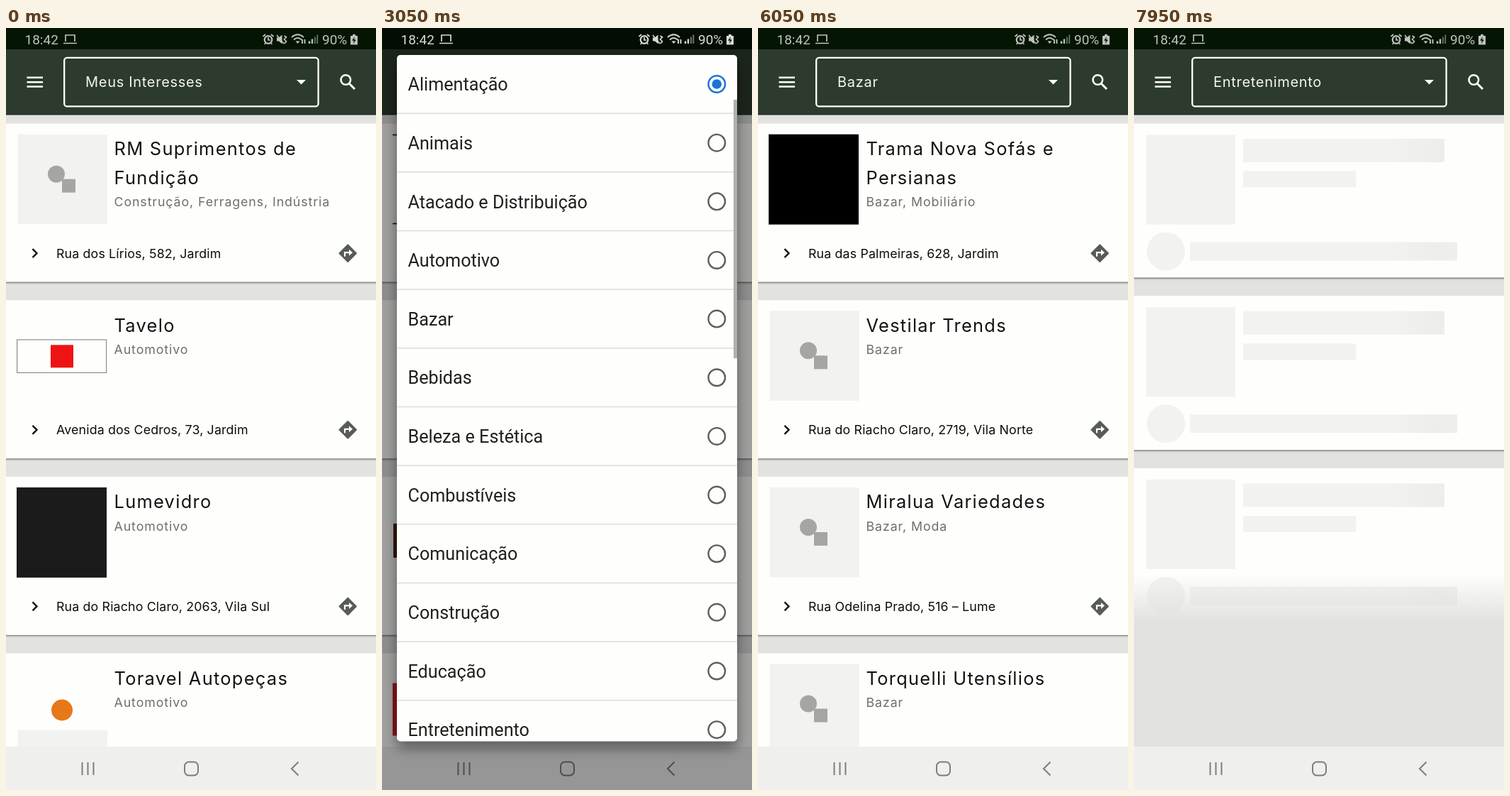
Animation of 522x1073 px, one loop 8 s. Source, as an HTML page:

```html
<!DOCTYPE html>
<html lang="pt-BR">
<head>
<meta charset="utf-8">
<title>Filtro por interesse</title>
<style>
html, body { margin: 0; width: 100%; height: 100%; overflow: hidden; background: #e2e3e1; }
svg { display: block; width: 100vw; height: 100vh; }
text { white-space: pre; }
.title, .sub, .addr, .filter { font-family: Inter, "Open Sans", sans-serif; }
.title { font-size: 25.4px; letter-spacing: 1.3px; fill: #111311; }
.sub { font-size: 17.8px; letter-spacing: .9px; fill: #6d6f6c; }
.addr { font-size: 17.8px; letter-spacing: .15px; fill: #0c0e0c; }
.filter { font-size: 20px; letter-spacing: .7px; fill: #f4f5f3; }
.option { font: 25.2px Roboto, sans-serif; fill: #1e201e; }
.clock { font: 19px Roboto, sans-serif; fill: currentColor; }
.line { fill: none; stroke: currentColor; }
</style>
</head>
<body>
<svg viewBox="0 0 522 1073" preserveAspectRatio="none">
  <defs>
    <linearGradient id="shimmer" gradientUnits="userSpaceOnUse" x1="-70" x2="70" y1="0" y2="0">
      <stop offset="0" stop-color="#f2f3f1"/>
      <stop offset=".5" stop-color="#edeeec"/>
      <stop offset="1" stop-color="#f2f3f1"/>
    </linearGradient>
    <linearGradient id="fadeOut" x1="0" x2="0" y1="0" y2="1">
      <stop offset="0" stop-color="#e2e3e1" stop-opacity="0"/>
      <stop offset="1" stop-color="#e2e3e1"/>
    </linearGradient>
    <filter id="blur" x="-10%" y="-10%" width="120%" height="120%"><feGaussianBlur stdDeviation="9"/></filter>
    <clipPath id="sheet"><rect x="21" y="38" width="480" height="966.5" rx="5"/></clipPath>
    <clipPath id="rowClip"><rect id="rowBox" x="21" width="480" height="82.65"/></clipPath>
  </defs>

  <rect width="522" height="1073" fill="#e2e3e1"/>
  <g id="pages"></g>

  <g id="header">
    <rect y="30" width="522" height="92" fill="#2c3b2d"/>
    <rect y="121" width="522" height="1.5" fill="#202c21"/>
    <g class="line" color="#fff">
      <path d="M29.5 69.8H52M29.5 76.2H52M29.5 82.6H52" stroke-width="2.5"/>
      <rect x="82.2" y="41.8" width="358.4" height="68.6" rx="4" stroke-width="2.3"/>
      <circle cx="479.3" cy="73" r="6.8" stroke-width="2.6"/>
      <path d="M484 78L492 86" stroke-width="3"/>
    </g>
    <path d="M410 73H423L416.5 79.6Z" fill="#fff"/>
    <text class="filter" id="filter" x="112" y="83"></text>
  </g>

  <rect y="1012" width="522" height="61" fill="#eff0ee"/>
  <g class="line" color="#7c7e7b" stroke-width="2">
    <path d="M107.5 1034V1052M115.5 1034V1052M123.5 1034V1052"/>
    <rect x="252" y="1033.5" width="19" height="19" rx="6"/>
    <path d="M412.5 1033.5L403 1043L412.5 1052.5"/>
  </g>

  <rect width="522" height="30" fill="#041504"/>
  <rect id="scrim" width="522" height="1073"/>

  <g id="status">
    <text class="clock" x="26.5" y="23">18:42</text>
    <text class="clock" x="446" y="23">90%</text>
    <g class="line" stroke-width="1.7">
      <path d="M84 19V10H97V19M81 21.5H100"/>
      <circle cx="370" cy="16.5" r="5.3" stroke-width="2.2"/>
      <path d="M370 13V17H373M362.5 12L366 9M377.5 12L374 9M364.5 23L366.5 21M375.5 23L373.5 21"/>
      <path d="M382 10L392 22M392.5 11L395.5 13L392.5 16L395.5 19L392.5 22"/>
      <path d="M403 13Q411.5 5.5 420 13M406 16.5Q411.5 11.5 417 16.5M418 16V22M421.5 22V16" stroke-width="1.9"/>
      <path d="M428 22V18.5M432 22V15.5" stroke-width="2.4"/>
      <path d="M436 22V12.5M439.3 22V9.5" stroke-width="2" opacity=".5"/>
    </g>
    <path d="M382 13.5H385L389.5 9.5V22.5L385 18.5H382ZM408.5 18.5H414.5L411.5 22ZM486 11H489V9H493V11H496V23.5H486Z" fill="currentColor"/>
    <path d="M491.8 12.5L488 17.8H490.8L490 22L494 16.5H491.2Z" fill="#041504"/>
  </g>

  <g id="dialog">
    <rect x="21" y="50" width="480" height="964" rx="6" opacity=".42" filter="url(#blur)"/>
    <rect x="21" y="38" width="480" height="966.5" rx="5" fill="#fefffd"/>
    <g clip-path="url(#sheet)">
      <g clip-path="url(#rowClip)"><circle id="ripple" cx="262" fill="#000" opacity=".17"/></g>
      <g id="menus"></g>
      <rect id="bar" x="496" width="5" height="364" fill="#aeb0ad"/>
    </g>
  </g>
</svg>

<script>
const LOOP = 8000, STEP = 50, ROW = 82.65;

const options = ['Meus Interesses', 'Agro', 'Alimentação', 'Animais', 'Atacado e Distribuição',
  'Automotivo', 'Bazar', 'Bebidas', 'Beleza e Estética', 'Combustíveis', 'Comunicação',
  'Construção', 'Educação', 'Entretenimento', 'Ferragens', 'Financeiro e Apostas',
  'Hospedagem', 'Imóveis'];

// open: menu appears, tap: row pressed, loaded: results replace the skeleton
const rounds = [
  { open: 600, tap: 1700, loaded: 2000, first: 0, row: 2 },
  { open: 2850, tap: 3900, loaded: 4750, first: 2, row: 4 },
  { open: 6100, tap: 7650, loaded: LOOP, first: 6, row: 7 }
];

const $ = id => document.getElementById(id);
const clamp = x => Math.max(0, Math.min(1, x));
const box = (x, y, w, h, fill, extra = '') =>
  `<rect x="${x}" y="${y}" width="${w}" height="${h}" fill="${fill}" ${extra}/>`;
const dot = (x, y, r, fill) => `<circle cx="${x}" cy="${y}" r="${r}" fill="${fill}"/>`;
const label = (cls, x, y, text) => `<text class="${cls}" x="${x}" y="${y}">${text}</text>`;

const thumbs = {
  blank: box(16.5, 15, 126.5, 126.5, '#f2f3f1') + dot(71, 71, 12, '#a4a6a3') + box(79, 78, 19, 19, '#a4a6a3'),
  framed: box(15.6, 55.6, 126, 46.5, '#fefffd', 'stroke="#8c8e8b" stroke-width="1.2"') + box(63, 63, 32, 32, '#ee1414'),
  dark: box(15, 15, 127, 127, '#1a1b1a'),
  orange: dot(79, 80, 15, '#e67817') + box(16.5, 108, 126.5, 34, '#f2f3f1'),
  black: box(15, 15, 127, 127, '#000'),
  lined: box(15, 15, 127, 1.6, '#111') + box(15, 140, 127, 1.6, '#111'),
  none: '',
  brown: box(16, 66, 125, 48, '#4b2414'),
  red: box(15, 42, 127, 74, '#d3202a')
};

// thumb, title lines, categories, address
const lists = [
  [
    ['blank', ['RM Suprimentos de', 'Fundição'], 'Construção, Ferragens, Indústria', 'Rua dos Lírios, 582, Jardim'],
    ['framed', ['Tavelo'], 'Automotivo', 'Avenida dos Cedros, 73, Jardim'],
    ['dark', ['Lumevidro'], 'Automotivo', 'Rua do Riacho Claro, 2063, Vila Sul'],
    ['orange', ['Toravel Autopeças'], 'Automotivo', '']
  ], [
    ['lined', ['Forno Miúdo'], 'Alimentação', 'Rua dos Lírios, 214, Jardim'],
    ['none', ['Tempero Manso'], 'Alimentação', 'Avenida dos Cedros, 95, Jardim'],
    ['brown', ['Cacau Sereno'], 'Alimentação', 'Rua das Palmeiras, 481, Jardim'],
    ['red', ['Mercado Cestalva'], 'Alimentação', '']
  ], [
    ['black', ['Trama Nova Sofás e', 'Persianas'], 'Bazar, Mobiliário', 'Rua das Palmeiras, 628, Jardim'],
    ['blank', ['Vestilar Trends'], 'Bazar', 'Rua do Riacho Claro, 2719, Vila Norte'],
    ['blank', ['Miralua Variedades'], 'Bazar, Moda', 'Rua Odelina Prado, 516 – Lume'],
    ['blank', ['Torquelli Utensílios'], 'Bazar', '']
  ]
];

const panel = h => box(0, 0, 522, h, '#fefffd') + box(0, h - .5, 522, 1.6, '#858785') + box(0, h + 1.1, 522, 1.6, '#cccdcb');

function card([thumb, title, tags, address], i) {
  const lines = title.map((s, n) => label('title', 152.5, 44.5 + 40.7 * n, s)).join('');
  return `<g transform="translate(0 ${134.7 + 248.6 * i})">${panel(223.4)}
    <g class="thumb">${thumbs[thumb]}</g>${lines}
    ${label('sub', 152.5, 35 + 40.7 * title.length, tags)}
    ${label('addr', 71, 189, address)}
    <path class="line" color="#111" stroke-width="2.4" d="M37.5 176.5L43.5 182.5L37.5 188.5"/>
    <path fill="#555d54" stroke="#555d54" stroke-width="2" stroke-linejoin="round" d="M482.3 170.7L494 182.5L482.3 194.3L470.5 182.5Z"/>
    <path class="line" color="#fff" stroke-width="2.2" d="M478 187V181.5H485"/>
    <path fill="#fff" d="M484 177L489 181.5L484 186Z"/></g>`;
}

function bones(i) {
  const fill = 'url(#shimmer)';
  return `<g transform="translate(0 ${134.5 + 242.7 * i})">${panel(217.5)}
    ${box(17, 16, 126, 126, fill)}${box(154, 21.5, 284, 33, fill)}${box(154, 67, 159, 23, fill)}
    ${dot(45, 180, 27, fill)}${box(79, 167, 377, 26, fill)}</g>`;
}

function option(text, i) {
  const y = 79 + ROW * i, color = i ? '#5d5f5d' : '#1c72d8';
  return label('option', 36.5, y + 9.2, text) +
    `<circle cx="472.3" cy="${y}" r="11.8" fill="none" stroke="${color}" stroke-width="2.4"/>` +
    (i ? '' : dot(472.3, y, 6.8, color)) + box(21, y + 40.4, 480, 1.6, '#dedfdd');
}

$('pages').innerHTML = lists.map(l => `<g>${l.map(card).join('')}</g>`).join('') +
  `<g>${[0, 1, 2].map(bones).join('')}${box(0, 770, 522, 64, 'url(#fadeOut)')}${box(0, 833, 522, 180, '#e2e3e1')}</g>`;
$('menus').innerHTML = rounds.map(r =>
  `<g>${options.slice(r.first, r.first + 12).map(option).join('')}</g>`).join('');

const pages = [...$('pages').children], menus = [...$('menus').children];
const newThumbs = pages[2].querySelectorAll('.thumb');
const show = (items, n) => items.forEach((el, i) => el.style.display = i === n ? '' : 'none');

// opacity after a tap, one value per step
const sheetOut = [1, 1, .8, .44, .13, 0], scrimOut = [.6, .6, .58, .5, .29, .1];

function draw(t) {
  const n = Math.max(0, rounds.findLastIndex(r => t >= r.open));
  const r = rounds[n], since = t - r.tap;
  let sheet = clamp((t - r.open + 50) / 250), scrim = .6 * clamp((t - r.open + 50) / 400);
  if (t < r.open) sheet = scrim = 0;
  if (since >= 0) {
    sheet = sheetOut[since / STEP] ?? 0;
    scrim = scrimOut[since / STEP] ?? 0;
  }

  const chosen = since >= 100;
  show(pages, !chosen ? n : t < r.loaded ? 3 : n + 1);
  show(menus, n);
  $('filter').textContent = options[r.first + (chosen ? r.row : 0)];
  newThumbs.forEach(el => el.style.opacity = clamp((t - 4700) / 300));

  $('dialog').style.display = sheet ? '' : 'none';
  $('dialog').style.opacity = sheet;
  $('scrim').style.opacity = scrim;
  $('status').style.color = scrim ? '#d9dbd8' : '#bfc4be';
  $('bar').setAttribute('y', 39 + 31 * r.first);

  $('rowBox').setAttribute('y', 38 + ROW * r.row);
  $('ripple').setAttribute('cy', 79 + ROW * r.row);
  $('ripple').setAttribute('r', since < 0 ? 0 : 162 * clamp((since + STEP) / 150));
  $('shimmer').setAttribute('gradientTransform', `translate(${(Math.max(0, since) * 1.2 + 70) % 840})`);
}

function tick() {
  draw(Math.floor(performance.now() % LOOP / STEP) * STEP);
  requestAnimationFrame(tick);
}
tick();
</script>
</body>
</html>
```
